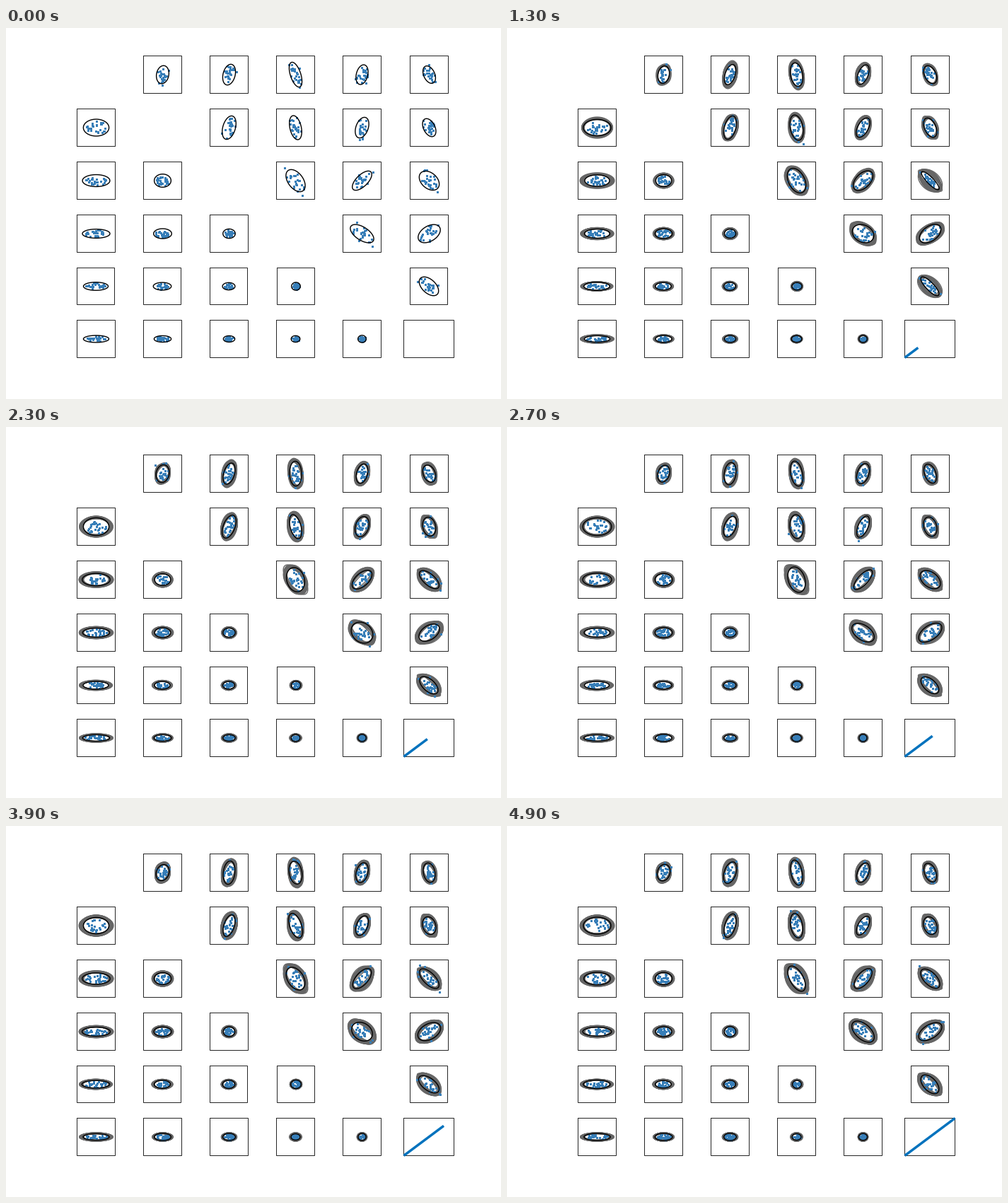
Animation of 700x525 px, one loop 5000 ms. Source, as a matplotlib script:

```python
import math

import matplotlib.pyplot as plt
import numpy as np
from matplotlib.animation import FuncAnimation
from matplotlib.collections import LineCollection

W, H, DPI = 700, 525, 100
PX = 72 / DPI
FRAMES, GRID, DOTS, ECHOES = 50, 6, 26, 2
INK, GRAY, DOT_BLUE, LINE_BLUE = "#262626", "#666666", "#377eb8", "#0072bd"

# Per variable: typical reach as x (by row) and as y (by column), shared factor
REACH_X = (8.7, 9.3, 13.5, 15.5, 13.5)
REACH_Y = (12, 15.5, 17, 14, 13)
LOADING = (0.4, 0.45, 0.75, -0.6, 0.75, -0.75)


def panel_box(row, col):
    """Pixel-aligned left, right, top and bottom of a near-square panel."""
    top = math.floor(39.45 + 74.9 * row)
    bottom = math.floor(92.55 + 74.83 * row)
    width = bottom - top + 1
    left = math.floor(127.05 + 94.2 * col - width / 2)
    return left + 0.5, left + width + 0.5, top + 0.5, bottom + 0.5


def outline(left, right, top, bottom):
    return [(left, top), (right, top), (right, bottom), (left, bottom), (left, top)]


def typical_pose(row, col):
    """Half-width, half-height and correlation of a panel's ellipse."""
    if row < col:
        return REACH_X[row], REACH_Y[col - 1], LOADING[row] * LOADING[col]
    return 19 / (1 + 0.6 * col), 19 / (1 + 0.6 * row), 0


def jitter(pose, rng):
    width, height, corr = pose
    scale = rng.uniform(0.92, 1.08, 2)
    if corr:
        corr += np.clip(rng.normal(0, 0.12), -0.3, 0.3)
    return width * scale[0], height * scale[1], corr


def place(points, center, pose, growth=1):
    """Map unit-circle coordinates onto a correlated ellipse."""
    width, height, corr = pose
    u, v = points.T * growth
    lift = corr * u + math.sqrt(1 - corr ** 2) * v
    return np.column_stack([center[0] + width * u, center[1] - height * lift])


def make_cloud(tilted, rng):
    if tilted:
        return np.clip(rng.normal(0, 0.46, (DOTS, 2)), -1.15, 1.15)
    radius = 0.8 * np.sqrt(rng.uniform(0, 1, DOTS))
    turn = rng.uniform(0, 2 * math.pi, DOTS)
    return np.column_stack([radius * np.cos(turn), radius * np.sin(turn)])


rng = np.random.default_rng(7)
theta = np.linspace(0, 2 * math.pi, 49)
circle = np.column_stack([np.cos(theta), np.sin(theta)])

panels = [(r, c) for r in range(GRID) for c in range(GRID) if r != c]
boxes = [outline(*panel_box(r, c)) for r, c in panels]
rings = [[] for _ in range(FRAMES)]
echoes = [[] for _ in range(FRAMES)]
clouds = [[] for _ in range(FRAMES)]
for row, col in panels:
    left, right, top, bottom = panel_box(row, col)
    center = ((left + right) / 2, (top + bottom) / 2)
    typical = typical_pose(row, col)
    for i in range(FRAMES):
        pose = jitter(typical, rng)
        rings[i].append(place(circle, center, pose))
        clouds[i].append(place(make_cloud(row < col, rng), center, pose))
        for _ in range(ECHOES):
            growth = rng.uniform(1, 1.2)
            echoes[i].append(place(circle, center, jitter(typical, rng), growth))

PROGRESS = (562.5, 633.5, 413.5, 466.5)
boxes.append(outline(*PROGRESS))

fig = plt.figure(figsize=(W / DPI, H / DPI), dpi=DPI, facecolor="white")
ax = fig.add_axes([0, 0, 1, 1])
ax.set_xlim(0, W)
ax.set_ylim(H, 0)
ax.axis("off")

for box in boxes:
    ax.plot(*zip(*box), color=INK, lw=PX, solid_joinstyle="miter",
            solid_capstyle="projecting", snap=False, zorder=1)
history = ax.add_collection(LineCollection([], colors=GRAY, lw=1.4 * PX, zorder=2))
dots, = ax.plot([], [], "s", color=DOT_BLUE, ms=3 * PX, mew=0, zorder=3)
current = ax.add_collection(LineCollection([], colors="black", lw=1.4 * PX, zorder=4))
progress, = ax.plot([], [], color=LINE_BLUE, lw=3.5 * PX,
                    solid_capstyle="butt", zorder=5)


def update(i):
    history.set_segments([ring for past in echoes[:i] for ring in past])
    current.set_segments(rings[i])
    dots.set_data(*np.concatenate(clouds[i]).T)
    left, right, top, bottom = PROGRESS
    done = i / (FRAMES - 1)
    progress.set_data([left, left + done * (right - left)],
                      [bottom, bottom - done * (bottom - top)])
    return history, dots, current, progress


anim = FuncAnimation(fig, update, frames=FRAMES, interval=100,
                     repeat=True, repeat_delay=0, blit=False)
plt.show()
```
